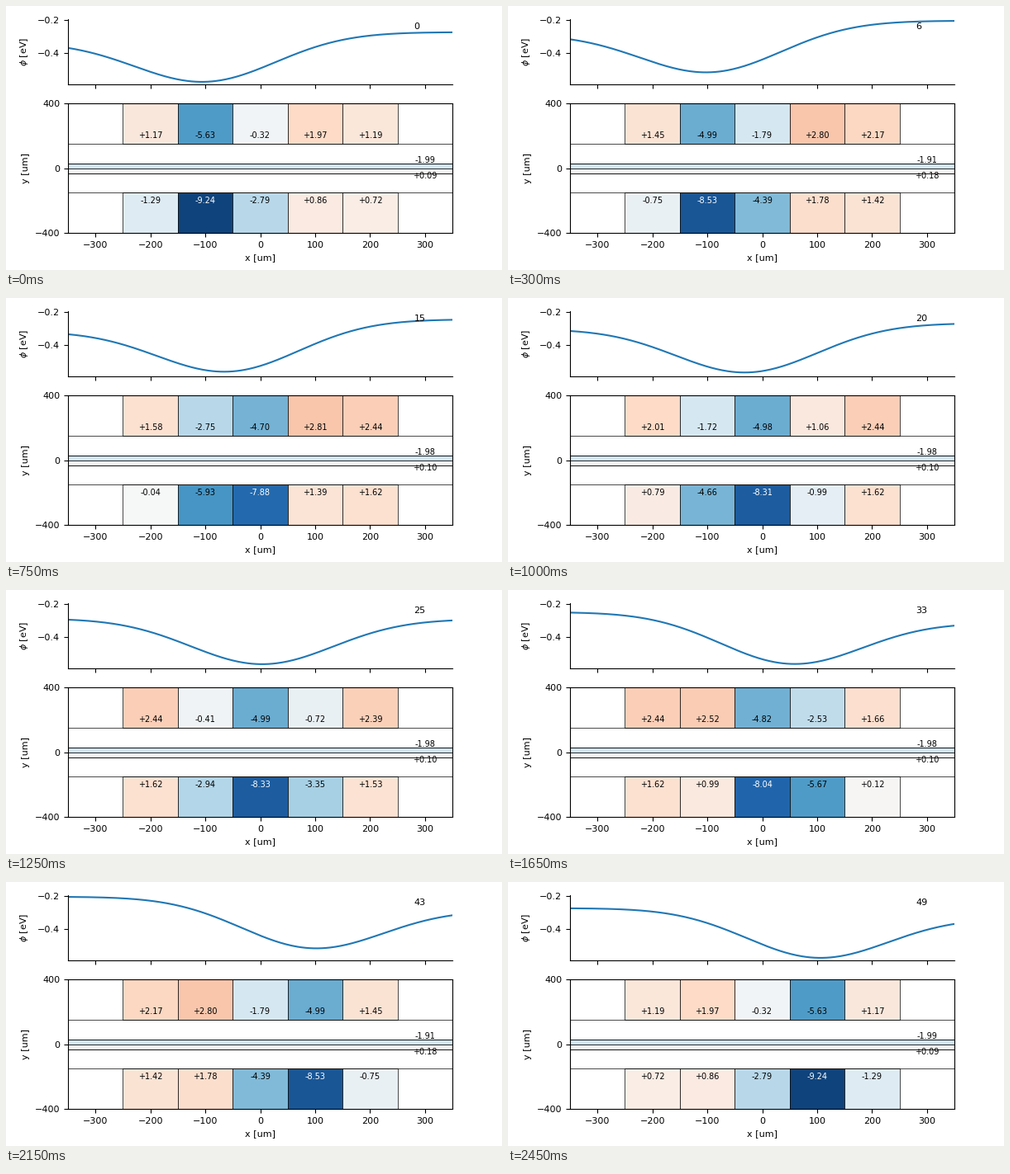
These frames come from a looping animation (600x320 px, 2500 ms). A matplotlib script:

```python
import numpy as np
import matplotlib.pyplot as plt
from matplotlib.animation import FuncAnimation
from matplotlib.colors import Normalize
from matplotlib.patches import Rectangle

FRAMES = 50
INTERVAL = 50
HALF_WIDTH = 350
GATE_CENTERS = range(-200, 201, 100)


def gate_row(s, outer, inner, middle):
    """Five gate voltages; the right side mirrors the left."""
    return [outer(s), inner(s), middle(abs(s)), inner(-s), outer(-s)]


def top_gates(s):
    return gate_row(
        s,
        lambda u: 2.44 + np.clip(1.5 * u, -0.9, 0) - (0.81 + 0.44 * u) * u**20,
        lambda u: -0.57 + 4.9 * u + 3.34 * u**2 - 4.6 * u**4 - 1.1 * u**7,
        lambda r: -4.99 + 4.67 * r**5)


def bottom_gates(s):
    return gate_row(
        s,
        lambda u: 1.62 + np.clip(2.9 * u, -2.21, 0) - (0.8 + 0.1 * u) * u**20,
        lambda u: -3.15 + 6.45 * u + 4.5 * u**2 - 5.54 * u**4 - 1.4 * u**7,
        lambda r: -8.33 + 5.54 * r**4.5)


def strips(s):
    bump = 0.24 * s**12 - 0.25 * s**32
    return [-1.98 + bump, 0.104 + bump]


def potential(x, s):
    """Gaussian well at 100 s on a level that sinks towards the near edge."""
    r = abs(s)
    level = -0.29 + 0.08 * r + 0.04 * r**8 - 0.103 * r**32
    sink = 0.138 * r - 0.069 * r**8
    edge = 170 + 80 * r**8
    slope = 1 / (1 + np.exp((edge - x * np.sign(s)) / 100))
    depth = 0.275 + 0.08 * r - 0.065 * r**2
    well = np.exp(-((x - 100 * s) / 130) ** 2 / 2)
    return level - sink * slope - depth * well


plt.rcParams.update({"font.family": "DejaVu Sans", "font.size": 8})
fig, (ax_phi, ax_dev) = plt.subplots(
    2, 1, sharex=True, figsize=(6, 3.2), dpi=100,
    gridspec_kw={"height_ratios": [1, 2]})
fig.subplots_adjust(left=0.125, right=0.9, top=0.95, bottom=0.14, hspace=0.2)

# Potential along the channel
x = np.linspace(-HALF_WIDTH, HALF_WIDTH, 281)
curve, = ax_phi.plot(x, np.zeros_like(x), color="C0", lw=1.5)
counter = ax_phi.text(0.9, 0.85, "", transform=ax_phi.transAxes)
ax_phi.spines[["top", "right"]].set_visible(False)
ax_phi.set_ylim(-0.589, -0.194)
ax_phi.set_yticks([-0.4, -0.2])
ax_phi.set_ylabel(r"$\phi$ [eV]")

# Device cross-section
cmap = plt.get_cmap("RdBu_r")
norm = Normalize(-10, 10)


def add_box(left, low, width, height):
    return ax_dev.add_patch(
        Rectangle((left, low), width, height, fc="none", ec="black", lw=0.5))


def add_electrode(left, low, width, height, label_x, label_y):
    label = ax_dev.text(label_x, label_y, "", fontsize=7,
                        ha="center", va="center")
    return add_box(left, low, width, height), label


def add_layer(low, height):
    return -HALF_WIDTH, low, 2 * HALF_WIDTH, height


electrodes = [add_electrode(c - 50, low, 100, 250, c, label_y)
              for low, label_y in ((150, 200), (-400, -200))
              for c in GATE_CENTERS]
electrodes += [add_electrode(*add_layer(low, 30), 300, label_y)
               for low, label_y in ((0, 50), (-30, -50))]
for low in (30, -150):
    add_box(*add_layer(low, 120))

ax_dev.set_xlim(-HALF_WIDTH, HALF_WIDTH)
ax_dev.set_ylim(-400, 400)
ax_dev.set_xticks(range(-300, 301, 100))
ax_dev.set_yticks([-400, 0, 400])
ax_dev.set_xlabel("x [um]")
ax_dev.set_ylabel("y [um]")
fig.align_ylabels([ax_phi, ax_dev])


def update(i):
    # The well eases from -100 um to +100 um.
    s = -np.cos(np.pi * i / (FRAMES - 1))
    curve.set_ydata(potential(x, s))
    counter.set_text(str(i))
    volts = top_gates(s) + bottom_gates(s) + strips(s)
    for (box, label), v in zip(electrodes, volts):
        box.set_facecolor(cmap(norm(v)))
        label.set_text(f"{v:+.2f}")
        label.set_color("white" if v < -7.5 else "black")
    return [curve, counter]


anim = FuncAnimation(fig, update, frames=FRAMES, interval=INTERVAL,
                     init_func=lambda: update(0), repeat=True, repeat_delay=0)
plt.show()
```
